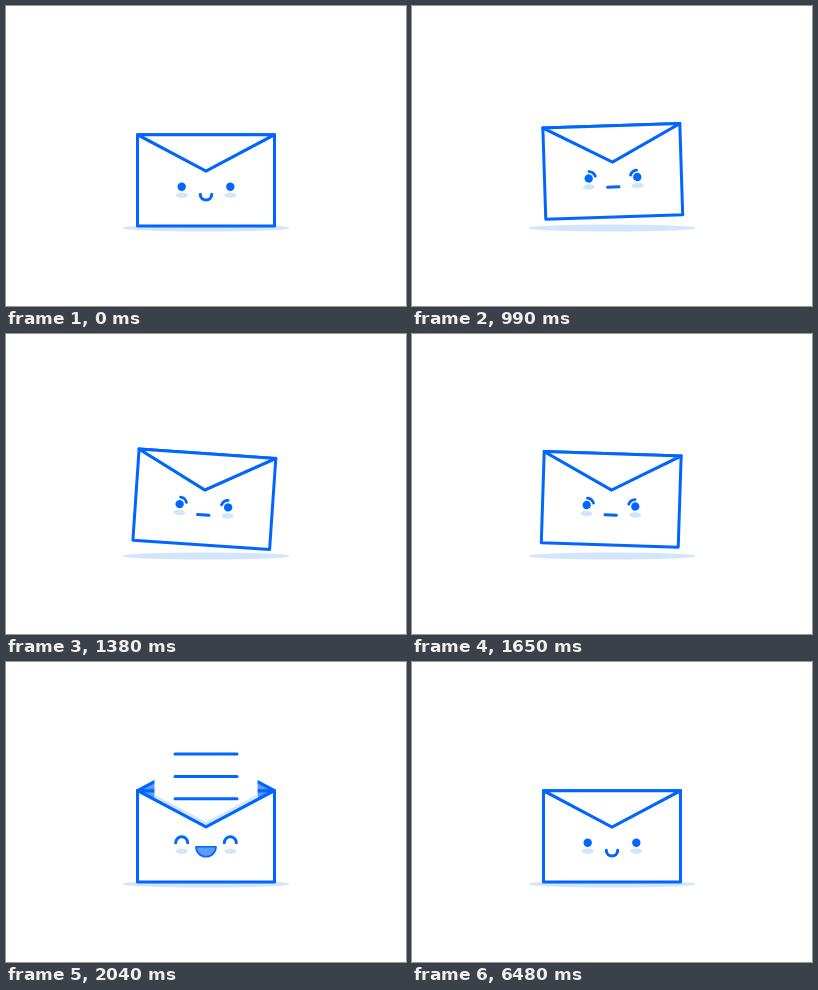
These frames come from a looping animation (400x300 px, 7.14 s). An HTML page with a canvas:

```html
<!DOCTYPE html>
<html lang="en">
<head>
<meta charset="utf-8">
<title>Envelope</title>
<style>
  html, body { margin: 0; width: 100%; height: 100%; overflow: hidden; background: #fff; }
  canvas { display: block; width: 400px; height: 300px; }
</style>
</head>
<body>
<canvas id="stage"></canvas>
<script>
const LOOP = 7140, STEP = 30;
const BLUE = '#0066ff', MID = '#5c9bfc', PALE = '#d2e5fb', WHITE = '#fff';
const LEFT = 131.5, RIGHT = 268.5, TOP = 128.7, BOTTOM = 220, DEPTH = 36.3;
const EYES = [175.7, 224.3];
const LETTER_IN = 166, LETTER_OUT = 73.3, LETTER_PEAK = 67.5;

const canvas = document.getElementById('stage');
const ctx = canvas.getContext('2d');
const scale = window.devicePixelRatio || 1;
canvas.width = 400 * scale;
canvas.height = 300 * scale;

const mix = (a, b, k) => a + (b - a) * k;
const ramp = (t, a, b) => Math.min(1, Math.max(0, (t - a) / (b - a)));
const ease = (t, a, b) => { const k = ramp(t, a, b); return k * k * (3 - 2 * k); };

function paint(fill, stroke, width = 3) {
  if (fill) { ctx.fillStyle = fill; ctx.fill(); }
  if (stroke) { ctx.strokeStyle = stroke; ctx.lineWidth = width; ctx.stroke(); }
}

function poly(points, closed, fill, stroke, width) {
  ctx.beginPath();
  points.forEach(([x, y]) => ctx.lineTo(x, y));
  if (closed) ctx.closePath();
  paint(fill, stroke, width);
}

function oval(x, y, rx, ry, fill) {
  ctx.beginPath();
  ctx.ellipse(x, y, rx, ry, 0, 0, 7);
  paint(fill);
}

function arc(x, y, r, from, to, fill, width) {
  ctx.beginPath();
  ctx.arc(x, y, r, from, to);
  if (fill) ctx.closePath();
  paint(fill, BLUE, width);
}

const vee = depth => [[LEFT, TOP], [200, TOP + depth], [RIGHT, TOP]];

function letter(top) {
  ctx.save();
  ctx.beginPath();
  ctx.rect(148.5, top, 103, Math.max(0, BOTTOM - 2 - top));
  paint(WHITE);
  ctx.clip();
  poly(vee(DEPTH), false, null, PALE, 9);
  ctx.restore();
  paint(null, BLUE);
  for (let i = 0; i < 3; i++) {
    const y = top + 18.7 + i * 22.4;
    poly([[169, y], [231, y]], false, null, BLUE);
  }
}

function letterTop(t) {
  if (t < 1980) return mix(LETTER_IN, LETTER_PEAK, ease(t, 1890, 1980));
  if (t < 6180) return mix(LETTER_PEAK, LETTER_OUT, ramp(t, 1980, 2040));
  return mix(LETTER_OUT, LETTER_IN, ease(t, 6185, 6405));
}

function face(t) {
  const laugh = t >= 1860 && t < 6360;
  const anger = t < 1860 ? ease(t, 510, 630) : 0;
  for (const x of EYES) {
    oval(x, 189.2, 6, 2.7, PALE);
    if (laugh) arc(x, 180.8, 6, Math.PI, 0, null, 3);
    else oval(x, 180.8, 4.2, 4.2, BLUE);
  }
  if (laugh) {
    arc(200, 184.8, 10, 0, Math.PI, MID, 1.6);
    return;
  }
  if (anger > 0) {
    ctx.globalAlpha = anger;
    arc(EYES[0], 180.8, 7, -1.5, -0.3, null, 2.8);
    arc(EYES[1], 180.8, 7, Math.PI + 0.3, Math.PI + 1.5, null, 2.8);
    ctx.globalAlpha = 1;
  }
  const y = mix(188.3, 190, anger), sag = mix(7.6, 0, anger);
  ctx.beginPath();
  ctx.moveTo(194.3, y);
  ctx.bezierCurveTo(194.3, y + sag, 205.7, y + sag, 205.7, y);
  paint(null, BLUE);
}

function draw(t) {
  ctx.setTransform(scale, 0, 0, scale, 0, 0);
  ctx.fillStyle = WHITE;
  ctx.fillRect(0, 0, 400, 300);
  ctx.lineCap = ctx.lineJoin = 'round';
  oval(200, 222, 83.5, 3.6, PALE);

  const lift = 9 * (ease(t, 510, 624) - ease(t, 1830, 1980));
  const shaking = t > 624 && t < 1784;
  const tilt = shaking ? 3.9 * Math.sin((t - 624) / 232 * 2 * Math.PI) : 0;
  ctx.translate(200, 150 - lift);
  ctx.rotate(tilt * Math.PI / 180);
  ctx.translate(-200, -150);

  // flap runs from 1 (shut) to -1 (fully open)
  const flap = 1 - 2 * (ease(t, 1784, 1944) - ease(t, 6330, 6480));
  poly(vee(DEPTH), true, MID, BLUE);
  if (flap < 0) poly(vee(DEPTH * flap), true, MID, BLUE);

  if (t > 1890 && t < 6480) {
    const top = letterTop(t);
    letter(top);
    if (t > 6180 && t < 6405) {
      // soft trailing blur while the sheet slides in
      ctx.globalAlpha = 0.4;
      letter(top + 2.2);
      ctx.globalAlpha = 1;
    }
  }

  poly([...vee(DEPTH), [RIGHT, BOTTOM], [LEFT, BOTTOM]], true, WHITE, BLUE);
  if (flap >= 0) poly(vee(DEPTH * flap), true, WHITE, BLUE);
  face(t);
}

const start = performance.now();
function tick() {
  const t = (performance.now() - start) % LOOP;
  draw(Math.floor(t / STEP) * STEP);
  requestAnimationFrame(tick);
}
tick();
</script>
</body>
</html>
```
